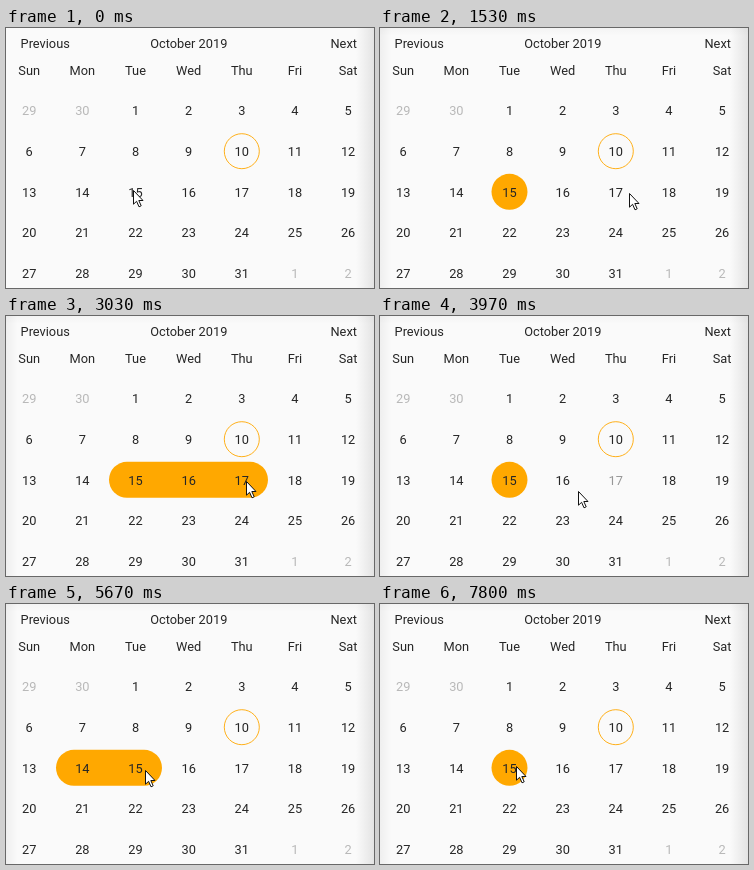
Recreate the animation shown at these times as an HTML page. Size 368 by 260 pixels, loop 8 s.

```html
<!DOCTYPE html>
<html lang="en">
<head>
<meta charset="utf-8">
<title>Calendar range picker</title>
<style>
html, body { margin: 0; height: 100%; overflow: hidden; background: #fafafa; }
svg { display: block; width: 368px; height: 260px; }
text { font: 12.8px Roboto, sans-serif; fill: #262626; text-anchor: middle; }
.muted { fill: #b8b8b8; }
</style>
</head>
<body>
<svg viewBox="0 0 368 260">
  <defs>
    <linearGradient id="left"><stop stop-opacity=".045"/><stop offset="1" stop-opacity="0"/></linearGradient>
    <linearGradient id="right"><stop stop-opacity="0"/><stop offset="1" stop-opacity=".09"/></linearGradient>
    <linearGradient id="top" x2="0" y2="1"><stop stop-opacity=".025"/><stop offset="1" stop-opacity="0"/></linearGradient>
  </defs>
  <rect width="368" height="260" fill="#fafafa"/>
  <g id="shade">
    <rect width="12" height="260" fill="url(#left)"/>
    <rect width="368" height="8" fill="url(#top)"/>
  </g>
  <rect x="350" width="18" height="260" fill="url(#right)"/>
  <g id="grid"></g>
  <path id="cursor" d="M.5 .5V14.2L3.6 11.3L6 16.8L8.2 15.8L5.8 10.5H10Z" fill="#fff" stroke="#111"/>
</svg>
<script>
const LOOP = 8000, ORANGE = '#ffa800', R = 18, COL = 53.15, ROW = 40.65;
const $ = id => document.getElementById(id);
const grid = $('grid');

function add(tag, attrs, parent = grid, content = '') {
  const el = document.createElementNS('http://www.w3.org/2000/svg', tag);
  for (const k in attrs) el.setAttribute(k, attrs[k]);
  el.textContent = content;
  parent.append(el);
  return el;
}

const colX = c => 23.2 + COL * c;
const rowY = r => 82.55 + ROW * r;

add('text', { x: 39.2, y: 20 }, grid, 'Previous');
add('text', { x: 182.8, y: 20 }, grid, 'October 2019');
add('text', { x: 337.7, y: 20 }, grid, 'Next');
'Sun Mon Tue Wed Thu Fri Sat'.split(' ').forEach((name, c) =>
  add('text', { x: colX(c), y: 47 }, grid, name));

const cells = {};
const first = new Date(2019, 8, 29);
for (let i = 0; i < 35; i++) {
  const date = new Date(2019, 8, first.getDate() + i), day = date.getDate();
  const inMonth = date.getMonth() === 9;
  const x = colX(i % 7), y = rowY(Math.floor(i / 7));
  const g = add('g', {});
  const back = add('path', { fill: ORANGE }, g);
  if (inMonth && day === 10)
    add('circle', { cx: x, cy: y, r: 17.5, fill: 'none', stroke: ORANGE, 'stroke-width': .9 }, g);
  add('text', { x, y: y + 4.85, class: inMonth ? '' : 'muted' }, g, day);
  if (inMonth) cells[day] = { g, back, x, y };
}

// Each tap dims its cell; releasing it selects the days from..to.
const taps = [
  { day: 15, down: 70, up: 770, from: 15, to: 15 },
  { day: 17, down: 1750, up: 2130, from: 15, to: 17 },
  { day: 17, down: 3410, up: 3800, from: 15, to: 15 },
  { day: 14, down: 4640, up: 5030, from: 14, to: 15 },
  { day: 14, down: 6700, up: 6730, from: 15, to: 15 }
];

// Pointer moves: start, end, destination and sideways bow of the curve.
const home = { x: 127, y: 162 };
const moves = [
  { start: 850, end: 1500, x: 249, y: 165, bowY: 31 },
  { start: 2180, end: 2930, x: 240, y: 165, bowX: -22, bowY: 30 },
  { start: 3825, end: 4260, x: 55, y: 174, bowY: 12 },
  { start: 4300, end: 4700, x: 77, y: 158 },
  { start: 5080, end: 5640, x: 139, y: 166, bowY: 14 },
  { start: 5950, end: 6450, x: 82, y: 169 },
  { start: 6760, end: 7650, x: 136, y: 162, bowY: 33 }
];

function ease(t, start, end) {
  const p = Math.min(1, Math.max(0, (t - start) / (end - start)));
  return p < .5 ? 2 * p * p : 1 - 2 * (1 - p) ** 2;
}

function pointer(t) {
  let { x, y } = home;
  for (const m of moves) {
    const p = ease(t, m.start, m.end), bow = 4 * p * (1 - p);
    x += (m.x - x) * p + (m.bowX || 0) * bow;
    y += (m.y - y) * p + (m.bowY || 0) * bow;
  }
  return [Math.round(x), Math.round(y)];
}

const dim = (tap, t) => .8 * ease(t, tap.down, tap.down + 150) * (1 - ease(t, tap.up + 70, tap.up + 320));

function shape({ x, y }, isFirst, isLast) {
  const arc = dy => `a${R} ${R} 0 0 1 0 ${dy}`;
  const top = y - R;
  if (isFirst && isLast) return `M${x} ${top}${arc(2 * R)}${arc(-2 * R)}`;
  const l = Math.round(x - COL / 2) + (isFirst ? R : 0);
  const r = Math.round(x + COL / 2) - (isLast ? R : 0);
  return `M${l} ${top}H${r}${isLast ? arc(2 * R) : 'v' + 2 * R}H${l}${isFirst ? arc(-2 * R) : 'z'}`;
}

function draw(now) {
  const t = now % LOOP;
  const range = taps.filter(tap => tap.up <= t).pop() || { from: 0, to: 0 };
  for (const day in cells) {
    const cell = cells[day], d = +day;
    const on = d >= range.from && d <= range.to;
    const dimmed = taps.filter(tap => tap.day === d).reduce((sum, tap) => sum + dim(tap, t), 0);
    cell.back.setAttribute('d', on ? shape(cell, d === range.from, d === range.to) : '');
    cell.g.setAttribute('opacity', 1 - dimmed);
  }
  $('cursor').setAttribute('transform', `translate(${pointer(t)})`);
  $('shade').setAttribute('opacity', t < 630 ? 0 : 1);
  requestAnimationFrame(draw);
}
draw(performance.now());
</script>
</body>
</html>
```
